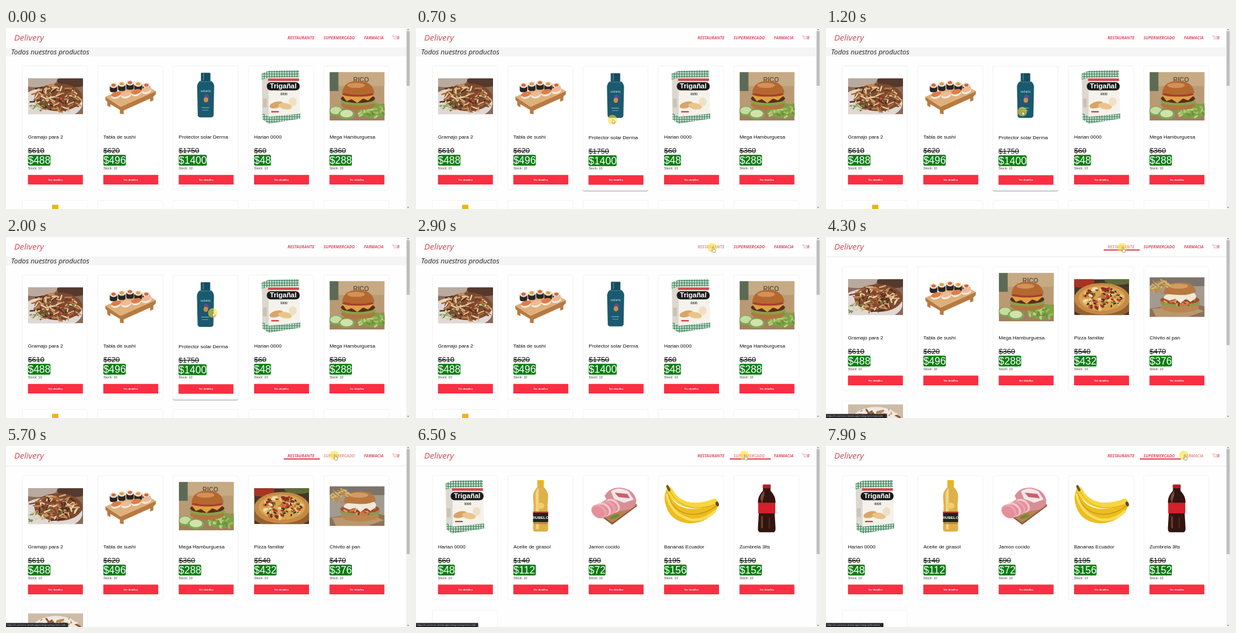
Animation, 640 px wide and 288 px high, one loop 8 s. Source, as an HTML page:

```html
<!DOCTYPE html>
<html lang="es">
<head>
<meta charset="utf-8">
<title>Delivery</title>
<style>
  html, body { margin: 0; width: 100%; height: 100%; overflow: hidden; background: #fefefe; }
  svg { display: block; }
  text { font-family: "Liberation Sans", Arial, sans-serif; }
  .brand, .heading, .nav { font-family: "Open Sans", sans-serif; font-style: italic; }
  .brand { font-size: 13.5px; fill: #d0474f; }
  .heading { font-size: 11px; fill: #222; }
  .nav { font-size: 6.5px; font-weight: 700; fill: #d9566a; }
  .nav.hover { fill: #e39a96; }
  .title { font-size: 8px; fill: #111; }
  .old { font-size: 11.7px; fill: #111; text-decoration: line-through; }
  .price { font-size: 16px; fill: #fff; }
  .stock { font-size: 5.3px; fill: #444; }
  .button { font-size: 4.1px; font-weight: 700; fill: #fff; text-anchor: middle; }
  .label { text-anchor: middle; font-weight: 700; }
  .card.hover { transform: translate(-.3px, .6px); filter: drop-shadow(0 1px .7px #0005); }
  .status { font-size: 4px; fill: #b5b8bd; }
</style>
</head>
<body>
<svg id="stage" width="640" height="288" viewBox="0 0 640 288"></svg>
<script>
const LOOP = 8000;

let seed = 7;
const rnd = () => (seed = (seed * 16807) % 2147483647) / 2147483647;

// SVG helpers
const rect = (x, y, w, h, fill, r = 0) =>
  `<rect x="${x}" y="${y}" width="${w}" height="${h}" rx="${r}" fill="${fill}"/>`;
const oval = (x, y, rx, ry, fill, turn = 0) =>
  `<ellipse cx="${x}" cy="${y}" rx="${rx}" ry="${ry}" fill="${fill}" transform="rotate(${turn} ${x} ${y})"/>`;
const path = (d, fill, stroke = 'none', width = 1) =>
  `<path d="${d}" fill="${fill}" stroke="${stroke}" stroke-width="${width}" stroke-linecap="round" stroke-linejoin="round"/>`;
const text = (cls, x, y, s, extra = '') => `<text class="${cls}" x="${x}" y="${y}" ${extra}>${s}</text>`;
const label = (x, y, size, s, fill) => text('label', x, y, s, `font-size="${size}" fill="${fill}"`);
const photo = (y, h, body) => `<svg x="9" y="${y}" width="87" height="${h}">${body}</svg>`;

// Short random strokes spread over an ellipse
function scatter(n, cx, cy, rx, ry, length, width, colors) {
  let out = '';
  for (let i = 0; i < n; i++) {
    const a = rnd() * 2 * Math.PI, r = Math.sqrt(rnd()), turn = rnd() * Math.PI;
    const x = cx + Math.cos(a) * r * rx, y = cy + Math.sin(a) * r * ry;
    const dx = Math.cos(turn) * length + .01, dy = Math.sin(turn) * length * .7;
    out += path(`M${x.toFixed(1)} ${y.toFixed(1)}l${dx.toFixed(2)} ${dy.toFixed(2)}`, 'none', colors[i % colors.length], width);
  }
  return out;
}

const fries = () => photo(20, 57,
  rect(0, 0, 87, 57, '#8b6a58') + oval(14, 2, 32, 12, '#b9aaa0') + oval(72, 4, 26, 10, '#54392c') +
  oval(36, 40, 50, 26, '#dfd8d4') + oval(48, 30, 38, 22, '#7d4a30') +
  scatter(100, 44, 29, 36, 21, 10, 2.2, ['#d9b07c', '#a96a3c', '#4f2d20', '#ecd4ac', '#7b4530', '#c58f58']) +
  scatter(16, 12, 45, 13, 8, 4, 2, ['#7f9150', '#c7cfa4']) + scatter(8, 50, 34, 26, 14, 3, 2.5, ['#9c3326', '#5d7434']));

const sushi = () =>
  path('M12 49 36 65 92 40v5L88 49v6l-5 2v-5L41 71v6l-6-1v-6L20 61v5l-5-3v-6l-3-3Z', '#b87a42') +
  path('M12 49 36 65 92 40 67 27Z', '#dfb07a') +
  [0, 1, 2, 3, 4].map(i => {
    const x = 25 + i * 13, y = 28 + Math.abs(i - 2) * 2;
    return rect(x - 6, y - 2, 12, 12, '#292523', 4) + oval(x, y - 1, 6, 4.2, '#efe3d4') + oval(x, y - 1.4, 3.4, 2.4, i % 2 ? '#dda046' : '#d2683c');
  }).join('') +
  [0, 1, 2, 3].map(i => {
    const x = 29 + i * 16, y = 48 - i * 3.5 + (i === 0 ? -3 : 0);
    return oval(x, y + 2.5, 8, 4.5, '#f4ece2', -15) + oval(x, y, 8, 4, i % 2 ? '#efb995' : '#dd7d4a', -15);
  }).join('');

const lotion = () =>
  path('M43 24h17q4 2 5 8l-1 47q-1 3-4 3H43q-3 0-4-3l-1-47q1-6 5-8z', '#1b596f') +
  rect(44, 11, 15, 14, '#164c60', 1) + rect(43.5, 24.5, 16, 1, '#4d8696') + rect(47, 12, 2, 11, '#3c7689') +
  label(51.5, 42, 5, 'solaria', '#8fc4cc') + oval(53, 50, 4, 5, '#5b4f8c') + oval(52, 54, 3.5, 4, '#d08b4a') +
  rect(45, 66, 12, 1, '#8fbcc4') + rect(46, 70, 10, 1, '#6ea3af');

const flour = () =>
  path('M21 12 32 8 80 7 82 84 32 92 22 85Z', '#f5f2ec') + path('M21 12 32 8V92L22 85Z', '#dcd8cf') +
  path('M21 12 32 8 80 7v11L32 19 21 22Z', 'url(#check)') + path('M22 75 32 81 82 76v8L32 92 22 85Z', 'url(#check)') +
  rect(31, 20, 49, 4, '#d4474a') + rect(29, 26, 52, 13, '#191919', 6) + label(55, 36, 11, 'Trigañal', '#fff') +
  label(56, 47, 5, '0000', '#444') + oval(44, 62, 11, 5, '#d8a566', -15) + oval(58, 64, 11, 5, '#e9c48b', 10) +
  oval(70, 57, 6, 7, '#efe0c4') + rect(23, 52, 6, 14, '#c9c3b5') + rect(36, 72, 12, 2, '#cf2f35');

const burger = () => photo(10, 77,
  rect(0, 0, 87, 77, '#b99a74') + rect(0, 0, 87, 22, '#c6aa84') + rect(0, 0, 14, 30, '#5c6a55') +
  label(50, 16, 10, 'RICO', '#6a5743') + path('M0 60 87 50V77H0Z', '#a17f5e') +
  oval(68, 61, 24, 12, '#7fa148') + scatter(24, 67, 62, 20, 10, 5, 3, ['#9cbc62', '#6c9039', '#b7d07f']) +
  oval(45, 52, 27, 8, '#b3763f') + oval(45, 47, 28, 6, '#86a248') +
  oval(45, 42, 27, 7, '#5a2c1d') + path('M20 37l50 0-9 8-8-3-9 7-9-6-8 3z', '#dfa043') + oval(45, 35, 25, 4, '#a5402c') +
  path('M20 33q2-19 25-19t26 19q-25 6-51 0z', '#b4682f') + oval(42, 21, 14, 4, '#d3915a') +
  oval(10, 62, 12, 8, '#79a650') + oval(10, 61, 9, 6, '#c7dba0') + oval(27, 67, 13, 8, '#7ea855') + oval(27, 66, 10, 6, '#d3e2ad'));

const pizza = () => photo(20, 57,
  rect(0, 0, 87, 57, '#473527') + oval(10, 4, 22, 9, '#a63422') + oval(70, 2, 22, 7, '#5f6b36') +
  oval(44, 38, 50, 25, '#94602f') + oval(44, 31, 44, 25, '#c58a48') + oval(44, 30, 37, 20, '#d8a350') +
  scatter(60, 43, 30, 34, 17, 4, 4, ['#b8452c', '#ecc677', '#c96f35', '#f0dcae', '#8b3021']) +
  scatter(34, 43, 30, 33, 16, 3, 2, ['#33261d', '#5c7a37', '#6f3524']));

const chivito = () => photo(17, 63,
  rect(0, 0, 87, 63, '#a39a90') + rect(0, 0, 87, 14, '#7c746b') + path('M0 50 60 40 87 46V63H0Z', '#8d7257') +
  path('M4 50 66 45 86 54 60 63H10Z', '#b79870') + oval(48, 47, 30, 9, '#bd8650') + oval(48, 40, 32, 7, '#8a9a52') +
  oval(48, 36, 31, 7, '#a84e30') + scatter(26, 48, 37, 27, 7, 5, 3, ['#cf7546', '#8b3f26', '#d9a05c']) +
  path('M24 29q8-5 18-3t27-2q8 5 3 10l-7 5-7-5-9 7-8-7-10 3-9-4z', '#f1e8d6') +
  path('M22 26q2-18 26-18t25 15q-10 6-26 5t-25-2z', '#b87840') + oval(46, 14, 15, 4, '#d49c62') +
  scatter(26, 14, 12, 13, 10, 8, 2.2, ['#d9b46c', '#b98d48']));

const oil = () =>
  path('M47 8h10v10q7 7 7 15l-1 14 1 38q0 4-4 4H44q-4 0-4-4l1-38-1-14q0-8 7-15z', '#dfb04a') +
  path('M44 30q0-6 5-11v66h-4z', '#f1d588') + rect(47, 7, 10, 8, '#e9b51d', 1) +
  rect(40, 58, 24, 16, '#26221c') + rect(40, 57, 24, 2, '#d8402c') + label(52, 69, 6, 'RUBELO', '#fff') +
  rect(41, 75, 22, 2, '#b98524') + oval(52, 48, 6, 5, '#f0cf6a');

const ham = () =>
  path('M14 54 54 29 86 48 46 78Z', '#8a5a36') + path('M14 52 54 27 86 46 46 75Z', '#b98153') +
  path('M34 32q8-14 26-13 20 3 24 19 1 12-12 16L48 58z', '#d98e97') + path('M44 25q12-9 28 0l8 13-15 5-16-6z', '#f2e8e6') +
  path('M50 27 70 29 74 36 56 34Z', '#c9606e') +
  [0, 1, 2, 3].map(i => oval(46 - i * 7, 48 + i * 3, 13, 10, ['#f4c9cc', '#e9a4ad'][i % 2], 35) + oval(45 - i * 7, 49 + i * 3, 11, 8, '#e58f9b', 35)).join('') +
  oval(50, 65, 8, 3, '#6d8b3c', -20);

const bananas = () =>
  path('M15 19q4 28 30 33 24 4 45-10l5 6q-14 27-45 28-34-2-40-35-2-14 5-22z', '#edbd1f') +
  path('M14 21q2 33 33 40 25 3 46-14', 'none', '#c8941a', 1.3) + path('M13 30q7 32 38 40 22 2 38-13', 'none', '#f8dd5c', 4) +
  path('M17 22q10 21 33 25 20 2 39-6', 'none', '#f7d63e', 9) + path('M18 25q12 22 36 26 18 1 35-5', 'none', '#d8a51c', 1) +
  path('M14 17l3 6', 'none', '#6b5a20', 4) + oval(93, 45, 2.5, 4, '#5b4a1e', -20);

const soda = () =>
  path('M46 15h12v9q8 8 8 18l-2 8 2 34q0 5-3 6H41q-3-1-3-6l2-34-2-8q0-10 8-18z', '#33150f') +
  path('M42 36q1-7 6-12v8q-3 6-3 14z', '#7b4a3c') + rect(46, 14, 12, 6, '#b91d22', 1) +
  rect(38.5, 43, 27, 17, '#d3202a') + rect(43, 64, 3, 20, '#6b3a2d', 1.5) + rect(55, 66, 2, 18, '#54281e', 1);

const platter = () => photo(5, 87,
  rect(0, 0, 87, 87, '#cdbba6') + oval(44, 30, 40, 26, '#efe8de') + scatter(24, 46, 18, 34, 12, 10, 3, ['#8a5a3c', '#f3eadf', '#b98a60']));

// Products: title, old price, new price, picture
const fry = ['Gramajo para 2', 610, 488, fries], roll = ['Tabla de sushi', 620, 496, sushi],
  sun = ['Protector solar Derma', 1750, 1400, lotion], meal = ['Harian 0000', 60, 48, flour],
  mega = ['Mega Hamburguesa', 360, 288, burger], pie = ['Pizza familiar', 540, 432, pizza],
  bun = ['Chivito al pan', 470, 376, chivito], sunflower = ['Aceite de girasol', 140, 112, oil],
  jam = ['Jamon cocido', 90, 72, ham], fruit = ['Bananas Ecuador', 195, 156, bananas],
  cola = ['Zumbrela 3lts', 190, 152, soda], dish = ['Picada', 300, 240, platter], plain = ['', 0, 0, () => ''];

const cardX = i => 26 + i * 119.4;

function card([title, old, price, picture], i, top) {
  const y = top + Math.floor(i / 5) * 214;
  return `<g transform="translate(${cardX(i % 5)} ${y})"><g class="card">` +
    '<rect width="103" height="197.5" rx="2" fill="#fff" stroke="#f3f3f3"/>' + picture() +
    text('title', 8.8, 115.8, title) + text('old', 8.8, 139, '$' + old) +
    rect(8.8, 141.5, String('$' + price).length * 8.9, 17.3, '#0b7d12', 2) + text('price', 8.8, 156, '$' + price) +
    text('stock', 8.8, 164.4, 'Stock: 10') + rect(8.8, 173.4, 87, 15.3, '#f92f42', .5) +
    text('button', 52.3, 182.6, 'Ver detalles') + '</g></g>';
}

const scrollbar = end => rect(634, 0, 6, 288, '#f1f1f1') + rect(634.6, 5, 4.8, end - 5, '#bdbdbd') +
  path('M635.5 3.2l1.5-1.7 1.5 1.7zM635.5 284.8l1.5 1.7 1.5-1.7z', '#666');
const page = (id, products, top, thumbEnd, extra = '') =>
  `<g id="${id}">${extra}${products.map((p, i) => card(p, i, top)).join('')}${scrollbar(thumbEnd)}</g>`;

const links = [
  { name: 'restaurante', x: 446, from: 440, to: 497 },
  { name: 'supermercado', x: 503, from: 497, to: 562 },
  { name: 'farmacia', x: 567, from: 562, to: 606 },
];

const stage = document.getElementById('stage');
stage.innerHTML =
  '<defs><pattern id="check" width="4" height="4" patternUnits="userSpaceOnUse">' +
  rect(0, 0, 4, 4, '#e9efe6') + rect(0, 0, 2, 4, '#2f7d5599') + rect(0, 0, 4, 2, '#2f7d5599') + '</pattern></defs>' +
  rect(0, 0, 640, 288, '#fefefe') + rect(0, 31, 640, .8, '#e6e6e6') +
  page('all', [fry, roll, sun, meal, mega, sunflower, jam, fruit, cola, pie], 60.3, 92,
    rect(0, 31, 634, 14, '#f5f5f5') + text('heading', 8, 42, 'Todos nuestros productos')) +
  page('food', [fry, roll, mega, pie, bun, dish], 47.2, 172) +
  page('market', [meal, sunflower, jam, fruit, cola, plain], 47.2, 172) +
  text('brand', 13, 20.3, 'Delivery') +
  links.map(l => text('nav', l.x, 18.4, l.name.toUpperCase())).join('') +
  path('M611.5 12.2h1.6l1.5 4h3.7l1-3h-5.8', 'none', '#e08a94', .6) + oval(615, 17.8, .6, .6, '#d8687a') + oval(618, 17.8, .6, .6, '#d8687a') +
  text('nav', 619.6, 18.4, '0') +
  '<rect id="underline" y="19.6" height="2" fill="#df4152"/>' +
  '<g id="status"><rect id="statusBox" y="281.6" height="6.4" fill="#25272b"/>' + text('status', 1.5, 286.2, '', 'id="address"') + '</g>' +
  '<g id="cursor">' + oval(0, 0, 7.5, 7.5, '#ffdf3399') +
  '<g id="hand">' + path('M.6-.6q.9-.9 1.7 0v3l2.4.6q.9.3.8 1.4l-.7 3H1.4L-.8 4.6q0-1 1.4-.2z', '#fff', '#444', .5) + '</g>' +
  '<g id="arrow">' + path('M0 0v6l1.5-1.3 1 2.2 1-.5-1-2.1h2z', '#fff', '#444', .4) + '</g></g>';

const $ = id => document.getElementById(id);
const show = (node, on) => { node.style.display = on ? '' : 'none'; };
const navItems = [...document.querySelectorAll('.nav')];
const topCards = [...document.querySelectorAll('#all .card')].slice(0, 5);

// Pointer stops: time, x, y
const stops = [[0, 312, 310], [200, 312, 310], [800, 311, 133], [1800, 311, 133], [2800, 469, 17],
  [4500, 469, 17], [5100, 520, 15], [6900, 520, 15], [7600, 567, 15], [LOOP, 567, 15]];

function pointer(t) {
  const i = Math.max(1, stops.findIndex(s => s[0] > t));
  const [t0, x0, y0] = stops[i - 1], [t1, x1, y1] = stops[i];
  const u = Math.max(0, (t - t0) / (t1 - t0)), k = u * u * (3 - 2 * u);
  return [x0 + (x1 - x0) * k, y0 + (y1 - y0) * k];
}

function linkAt(t) {
  const [x, y] = pointer(t);
  return y < 22 ? links.findIndex(l => x >= l.from && x < l.to) : -1;
}

function draw(t) {
  const [x, y] = pointer(t), over = linkAt(t), active = t < 3200 ? -1 : t < 6100 ? 0 : 1;

  show($('all'), t < 3200);
  show($('food'), t >= 3500 && t < 6100);
  show($('market'), t >= 6400);

  topCards.forEach((c, i) => c.classList.toggle('hover', y > 60 && y < 258 && x > cardX(i) && x < cardX(i) + 103));
  navItems.forEach((n, i) => n.classList.toggle('hover', i === over));

  show($('underline'), active >= 0);
  if (active >= 0) {
    $('underline').setAttribute('x', links[active].from);
    $('underline').setAttribute('width', links[active].to - links[active].from);
  }

  // The address appears a moment after the pointer reaches a link
  const target = linkAt(t - 350);
  show($('status'), target >= 0);
  if (target >= 0) {
    const address = 'https://e-comerce-tienda.app/category/' + links[target].name;
    $('address').textContent = address;
    $('statusBox').setAttribute('width', 5 + address.length * 1.87);
  }

  $('cursor').setAttribute('transform', `translate(${x} ${y})`);
  show($('hand'), over >= 0);
  show($('arrow'), over < 0);
}

function tick() {
  draw(performance.now() % LOOP);
  requestAnimationFrame(tick);
}
tick();
</script>
</body>
</html>
```
